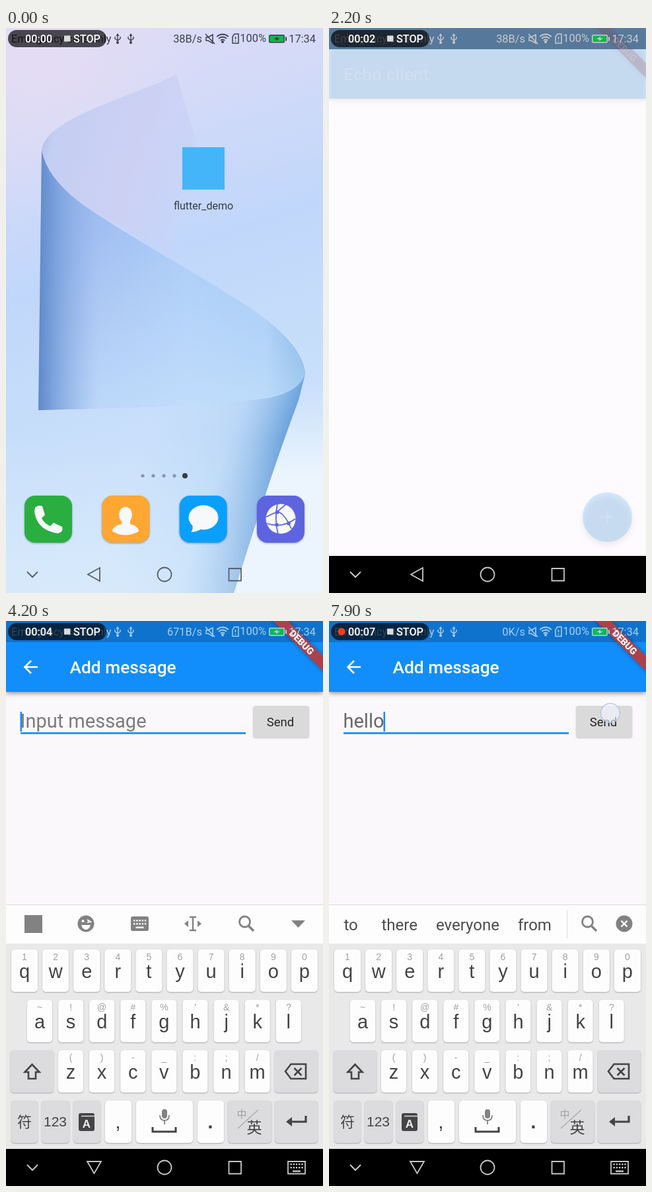
These frames come from a looping animation (480 by 853 pixels, 8 s). An HTML page with a canvas:

```html
<!DOCTYPE html>
<html lang="en">
<head>
<meta charset="utf-8">
<title>Echo client</title>
<style>
html, body { margin: 0; width: 480px; height: 853px; overflow: hidden; background: #000 }
canvas { display: block }
</style>
</head>
<body>
<canvas id="stage" width="480" height="853"></canvas>
<script>
const c = document.getElementById('stage').getContext('2d');
const LOOP = 8000, STEP = 100;
const BLUE = '#118efb', GREY = '#828282';
const SANS = 'Roboto, sans-serif';
const KEYS = '"Liberation Sans", Arial, sans-serif';
const CJK = '"Noto Sans CJK SC", "Noto Sans CJK", sans-serif';

// start, end, x, y of each finger press
const TAPS = [
  [100, 500, 322, 228], [3100, 3400, 421, 738], [3700, 3900, 190, 152],
  [4800, 5000, 286, 605], [5400, 5600, 122, 530], [5900, 6100, 428, 605],
  [6400, 6600, 428, 605], [6900, 7100, 404, 530], [7400, 7600, 48, 458],
  [7800, 8000, 426, 139]
];
// time, text in the field, suggestions
const EDITS = [
  [4100, '', null],
  [4900, 'h', 'h have he had his how'],
  [5500, 'he', "he hello Head he's her here"],
  [6000, 'hel', 'hel hello help held helps'],
  [6500, 'hell', 'hell hello hellos help'],
  [7000, 'hello', 'hello hellos Hello help'],
  [7500, 'hello', 'to there everyone from']
];

const clamp = v => Math.max(0, Math.min(1, v));
const phase = (t, from, to) => clamp((t - from) / (to - from));
const mix = (a, b, p) => a + (b - a) * p;
const out = u => 1 - (1 - u) ** 1.74;
const lastEdit = t => EDITS.filter(e => t >= e[0]).pop();

function fill(d, color) { c.fillStyle = color; c.fill(new Path2D(d)); }
function stroke(d, color, width = 2) {
  c.strokeStyle = color; c.lineWidth = width; c.stroke(new Path2D(d));
}
function rect(x, y, w, h, color) { c.fillStyle = color; c.fillRect(x, y, w, h); }
function round(x, y, w, h, r, color) {
  c.fillStyle = color; c.beginPath(); c.roundRect(x, y, w, h, r); c.fill();
}
function disc(x, y, r, color, ry = r) {
  c.fillStyle = color; c.beginPath(); c.ellipse(x, y, r, ry, 0, 0, 7); c.fill();
}
function ring(x, y, r, color, width = 2, a = 0, b = 2 * Math.PI) {
  c.strokeStyle = color; c.lineWidth = width;
  c.beginPath(); c.arc(x, y, r, a, b); c.stroke();
}
function text(s, x, y, size, color, align = 'left', weight = 400, family = SANS) {
  c.font = `${weight} ${size}px ${family}`;
  c.textAlign = align; c.fillStyle = color; c.fillText(s, x, y);
}
function gradient(x0, y0, x1, y1, ...stops) {
  const g = c.createLinearGradient(x0, y0, x1, y1);
  stops.forEach(([at, color]) => g.addColorStop(at, color));
  return g;
}
function layer(paint, { alpha = 1, dy = 0, shadow } = {}) {
  c.save();
  c.globalAlpha *= alpha;
  c.translate(0, dy);
  if (shadow) [c.shadowColor, c.shadowBlur, c.shadowOffsetY] = shadow;
  paint();
  c.restore();
}

function wallpaper() {
  rect(0, 0, 480, 853, gradient(60, 0, 330, 853, [0, '#dfdcf7'], [.2, '#d2daf8'],
    [.42, '#c0d7fb'], [.62, '#c6ddfa'], [1, '#d3e7fb']));
  const glow = c.createRadialGradient(60, 60, 0, 60, 60, 240);
  glow.addColorStop(0, 'rgba(232,220,243,.7)');
  glow.addColorStop(1, 'rgba(232,220,243,0)');
  rect(0, 0, 480, 320, glow);
  fill('M258 70C190 105 60 135 54 185Q62 225 110 262L360 412Z', gradient(54, 120, 300, 190,
    [0, '#a3b9e6'], [.12, '#c4cef2'], [.6, '#ccd1f4'], [.9, 'rgba(200,210,247,.7)'], [1, 'rgba(200,212,248,0)']));
  fill('M453 522L443 562Q402 670 345 853H480V522Z',
    gradient(0, 522, 0, 680, [0, 'rgba(205,226,251,0)'], [.6, '#dcecfc'], [1, '#ecf5fd']));
  const lower = 'M49 577Q330 570 400 558Q445 548 453 522L443 562Q402 670 345 853H0V577Z';
  fill(lower, gradient(210, 626, 398, 689, [0, 'rgba(180,210,246,0)'], [.6, 'rgba(165,202,242,.35)'], [1, '#6ea4dd']));
  fill(lower, gradient(0, 620, 0, 853, [0, 'rgba(222,239,253,0)'], [1, 'rgba(222,239,253,.5)']));
  const sheet = 'M54 185Q62 225 110 262C200 325 300 375 380 430Q450 480 453 522Q445 548 400 558Q330 570 49 577Z';
  fill(sheet, gradient(50, 0, 453, 0, [0, '#9ebbef'], [.2, '#a0bdf1'],
    [.55, '#abccf7'], [.85, '#a2c9f4'], [1, '#6aa2dc']));
  fill(sheet, gradient(0, 300, 0, 577, [0, 'rgba(204,230,253,0)'], [1, 'rgba(204,230,253,.65)']));
  fill(sheet, gradient(50, 0, 140, 0, [0, '#5f8aca'], [.25, 'rgba(112,151,214,.8)'], [1, 'rgba(140,175,232,0)']));
}

function home(t) {
  wallpaper();
  const pressed = t >= 100 && t < 500;
  round(267, 180, 64, 64, 0, pressed ? '#3b9fdc' : '#44b5f8');
  text('flutter_demo', 299, 274, 16, '#343b48', 'center');
  for (let i = 0; i < 5; i++) disc(207 + 16 * i, 676, i < 4 ? 2.6 : 4, i < 4 ? '#8496b2' : '#363b45');

  ['#2aae3f', '#ffa733', '#0a9ffb', '#5e63df'].forEach((color, i) =>
    layer(() => round(28 + 117.3 * i, 706, 72, 71, 16, color), { shadow: ['rgba(40,70,120,.5)', 3, 1] }));
  const white = '#f6f8fa';
  fill('M44 724Q50 719 55 722L59 735L54 740Q58 748 67 752L72 747L85 753Q88 760 79 763Q47 759 43 730Z', white);
  disc(181, 735, 10, white, 12);
  fill('M161 760Q161 752 175 749V742H188V749Q201 752 201 760Q181 771 161 760Z', white);
  disc(299, 739, 22.5, white, 18.5);
  fill('M282 748Q284 757 280 761Q290 761 297 755Z', white);
  disc(416, 741, 22.5, white);
  stroke('M411 718Q406 742 412 764M395 748Q418 756 438 741M411 730Q422 733 432 756M394 738L411 730L424 719', '#5e63df', 1.8);
  [[411, 731], [410, 750], [428, 748]].forEach(([x, y]) => disc(x, y, 2.8, '#5e63df'));
}

function opening(t) {
  const u = phase(t, 400, 1000), p = out(u);
  if (!u) return;
  const x = mix(259, 0, p), y = mix(176, 0, p), right = mix(347, 480, p), bottom = mix(247, 797, p);
  layer(() => {
    rect(x, y, right - x, bottom - y, '#fafbfe');
    rect(x, y, right - x, 33 * p, '#15161b');
  }, { alpha: Math.min(1, u * 1.94) });
}

function banner() {
  c.save();
  c.translate(447.8, 32.2);
  c.rotate(Math.PI / 4);
  layer(() => rect(-60, -8, 120, 16, '#ad414b'), { shadow: ['rgba(0,0,0,.35)', 6, 0] });
  text('DEBUG', 0, 5, 14.3, '#fff', 'center', 900);
  c.restore();
}

function page(title, titleX) {
  rect(0, 0, 480, 797, '#faf8fb');
  layer(() => rect(0, 0, 480, 107, BLUE), { shadow: ['rgba(0,0,0,.45)', 7, 2] });
  rect(0, 0, 480, 32, '#0f73cd');
  text(title, titleX, 79, 26.3, '#fff', 'left', 500);
}

function listPage(t) {
  page('Echo client', 22);
  layer(() => disc(421.5, 738.5, 37.5, BLUE), { shadow: ['rgba(0,0,0,.4)', 9, 5] });
  if (t >= 3100) disc(421.5, 738.5, 37.5 * phase(t, 3000, 3300), 'rgba(255,255,255,.2)');
  stroke('M421.5 729V748M412 738.5H431', '#fff', 2.7);
}

function formPage(t) {
  page('Add message', 96.5);
  stroke('M48 69.5H29M38 60L28.5 69.5L38 79', '#fff', 2.6);
  const edit = lastEdit(t);
  const value = edit ? edit[1] : '';
  const focused = t >= 3900;
  text(value || 'Input message', 21.5, 161, 29, value ? '#686868' : '#7b7b7b');
  const end = value ? 20.5 + c.measureText(value).width : 21.5;
  if (value && t < 7500) rect(22, 163, end - 22, 1.5, '#686868');
  rect(22, focused ? 168 : 169, 341, focused ? 2.7 : 1.3, focused ? BLUE : '#999');
  if (edit && (t - edit[0]) % 1000 < 500) rect(end, 137, 2.5, 30, BLUE);
  layer(() => round(374, 128, 85, 48, 4, '#dadadb'), { shadow: ['rgba(0,0,0,.2)', 2, 1] });
  text('Send', 415.5, 158.5, 18.5, '#242424', 'center');
}

function magnifier(x) {
  ring(x - 2.5, 454, 8, GREY, 2.8);
  stroke(`M${x + 3} 460L${x + 11} 468`, GREY, 3.4);
}

function keyboardIcon(x, y, ink) {
  for (let row = 0; row < 2; row++)
    for (let i = 0; i < 5; i++) rect(x - 9.5 + 4.2 * i, y - 6 + 5 * row, 2.4, 2.4, ink);
  rect(x - 6, y + 4.5, 12, 2.4, ink);
}

function toolbar() {
  rect(28, 444, 27, 27, GREY);
  disc(121, 457, 12.5, GREY);
  disc(116.5, 453, 2, '#fff');
  stroke('M123 451L128 454L123 455', '#fff', 1.8);
  fill('M114 459H128Q126 466 121 466T114 459Z', '#fff');
  round(189, 446, 27, 22, 3, GREY);
  keyboardIcon(202.5, 457, '#fff');
  stroke('M278 447H288M278 467H288M283 447V467', GREY, 2.4);
  fill('M276 452V462L270 457ZM290 452V462L296 457Z', GREY);
  magnifier(364);
  fill('M432 452H453L442.5 463Z', GREY);
}

function suggestions(words, picked) {
  c.save();
  c.beginPath(); c.rect(0, 428, picked ? 360 : 405, 59); c.clip();
  let x = 22.5;
  words.split(' ').forEach((word, i) => {
    text(word, x, 467, 24, i || picked ? '#4c4c4c' : '#f46a1c');
    x += Math.max(c.measureText(word).width, picked ? 29 : 34) + 28;
  });
  c.restore();
  if (picked) {
    rect(360, 437, 1, 42, '#ddd');
    magnifier(394);
    disc(447, 457, 12.5, GREY);
    stroke('M442.5 452.5L451.5 461.5M451.5 452.5L442.5 461.5', '#fff', 2.4);
  } else stroke('M437 448L447 458L437 468', GREY, 2.4);
}

function keyboard(t) {
  rect(0, 428, 480, 369, '#e9e9ea');
  rect(0, 428, 480, 59, '#fdfdfd');
  rect(0, 428, 480, 1, '#d9d9da');
  const edit = lastEdit(t);
  if (edit && edit[2]) suggestions(edit[2], t >= 7500); else toolbar();

  const ink = '#444';
  const key = (x, y, w, color = '#fdfdfd') => {
    const down = TAPS.some(([a, b, px, py]) => t >= a && t < b && px > x && px < x + w && py > y && py < y + 64);
    layer(() => round(x, y, w, 64, 5, down ? '#d2d2d4' : color), { shadow: ['rgba(0,0,0,.28)', 2, 1] });
  };
  const row = (letters, hints, x, y, w) => [...letters].forEach((letter, i) => {
    const mid = x + 47.1 * i;
    key(mid - w / 2, y, w);
    text(hints[i], mid, y + 16, 14, '#a0a0a0', 'center', 400, KEYS);
    text(letter, mid, y + 42.5, 29, ink, 'center', 400, KEYS);
  });
  row('qwertyuiop', '1234567890', 28, 496, 40);
  row('asdfghjkl', "~!@#%'&*?", 51, 572, 38);
  row('zxcvbnm', '()-_:;/', 98, 648, 38);
  [[7, 648, 65], [407, 648, 65], [8, 724, 40], [54, 724, 42], [102, 724, 41], [336, 724, 66], [407, 724, 65]]
    .forEach(([x, y, w]) => key(x, y, w, '#dcdcde'));
  [[150, 40], [197, 86], [290, 40]].forEach(([x, w]) => key(x, 724, w));

  stroke('M39.5 669.5L28.500 681H34V691H45V681H50.5Z', ink, 2.6);
  stroke('M423 680L431.500 669H454V691H431.500ZM436.500 675L447.500 686M447.500 675L436.500 686', ink, 2.6);
  text('符', 28, 764, 22, ink, 'center', 400, CJK);
  text('123', 74.5, 763, 21, ink, 'center', 400, KEYS);
  round(110, 743, 24, 27, 3, ink);
  stroke('M114 747.5H134', '#dcdcde', 1.5);
  text('A', 122, 765, 17, '#eee', 'center', 700, KEYS);
  text(',', 169.5, 766, 30, ink, 'center', 400, KEYS);
  text('.', 309.5, 766, 30, ink, 'center', 700, KEYS);
  round(236, 737, 8, 14, 4, GREY);
  stroke('M233 746Q233 754 240 754T247 746M240 754V760', GREY, 1.8);
  stroke('M222 764V771H257V764', ink, 3);
  text('中', 357, 750, 15, '#a0a0a0', 'center', 400, CJK);
  text('英', 376, 773, 23, ink, 'center', 400, CJK);
  stroke('M351 766L382 738', '#a8a8a8', 1.2);
  stroke('M454 747V756H430', ink, 3.2);
  fill('M424 756L433 749V763Z', ink);
}

function statusBar(t, color) {
  text('Emergency calls only', 8, 22, 16.2, color);
  for (const x of [169, 189]) {
    stroke(`M${x} 11V22M${x - 4} 13V16L${x} 19L${x + 4} 16V13`, color, 1.4);
    fill(`M${x - 2.5} 12L${x} 8L${x + 2.5} 12Z`, color);
    disc(x, 22, 2, color);
  }
  text(t < 3100 ? '38B/s' : t < 5100 ? '671B/s' : '0K/s', 297, 22, 16.4, color, 'right');
  stroke('M303 14V19H306L313 23V10L306 14ZM302 9L316 24', color, 1.5);
  for (const r of [4.5, 8.5, 12.5]) ring(328, 22, r, color, 1.8, -2.35, -.79);
  disc(328, 21, 2, color);
  stroke('M343 13L346 9H352V23H343ZM347.5 13V17M347.5 19V20.5', color, 1.5);
  text('100%', 394, 21, 16.4, color, 'right');
  round(398, 10, 24, 12.5, 2, color);
  rect(399.5, 11.5, 21, 9.5, '#0cba50');
  rect(423, 13.5, 2, 6, color);
  fill('M405 17L411 13V15.5H415L409 19.5V17Z', color);
  text('17:34', 469, 22, 16.4, color, 'right');

  round(3, 3, 149, 26, 13, 'rgba(0,0,0,.68)');
  const clock = Math.max(0, t - 100);
  if (clock % 1000 >= 500) disc(19, 16, 5.5, '#fb3a16');
  text('00:0' + Math.floor(clock / 1000), 29, 22, 16.2, '#fff', 'left', 500);
  rect(88, 11.5, 9.5, 9, '#dcdcdc');
  text('STOP', 102, 22, 16.2, '#fff', 'left', 500);
}

function navBar(color, typing) {
  stroke('M32 821L40 829L48 821', color, 2);
  stroke(typing ? 'M123 816H144L133.5 834Z' : 'M142 815V835L124 825Z', color, 1.8);
  ring(240, 825, 10.5, color, 1.8);
  stroke('M337.500 816H356V834.500H337.500Z', color, 1.8);
  if (typing) {
    stroke('M427 816H453V834.500H427Z', color, 1.8);
    keyboardIcon(440, 825, color);
  }
}

function draw(t) {
  const inApp = t >= 1000;
  if (!inApp) {
    home(t);
    opening(t);
  } else {
    rect(0, 0, 480, 797, '#fdfbfe');
    rect(0, 0, 480, 32, '#69666a');
    const shown = phase(t, 2100, 2700), pushed = phase(t, 3300, 3700);
    if (shown) layer(() => { if (pushed < 1) listPage(t); }, { alpha: shown });
    if (pushed) layer(() => formPage(t), { alpha: pushed, dy: 200 * (1 - out(pushed)) });
    if (shown) layer(banner, { alpha: shown });
    const rise = out(phase(t, 3900, 4200));
    if (rise) layer(() => keyboard(t), { dy: 369 * (1 - rise) });
    rect(0, 797, 480, 56, '#000');
  }
  statusBar(t, inApp ? (t < 2300 ? '#cbc9cc' : '#a9cff2') : '#3b404c');
  navBar(inApp ? '#c6c6c6' : '#59616d', t >= 4000);
  for (const [from, to, x, y] of TAPS) if (t >= from && t < to) {
    disc(x, y, 15, 'rgba(245,247,253,.6)');
    ring(x, y, 14.5, 'rgba(165,187,235,.75)', 1.5);
  }
}

function tick() {
  const t = performance.now() % LOOP;
  draw(Math.floor(t / STEP) * STEP);
  requestAnimationFrame(tick);
}
tick();
</script>
</body>
</html>
```
